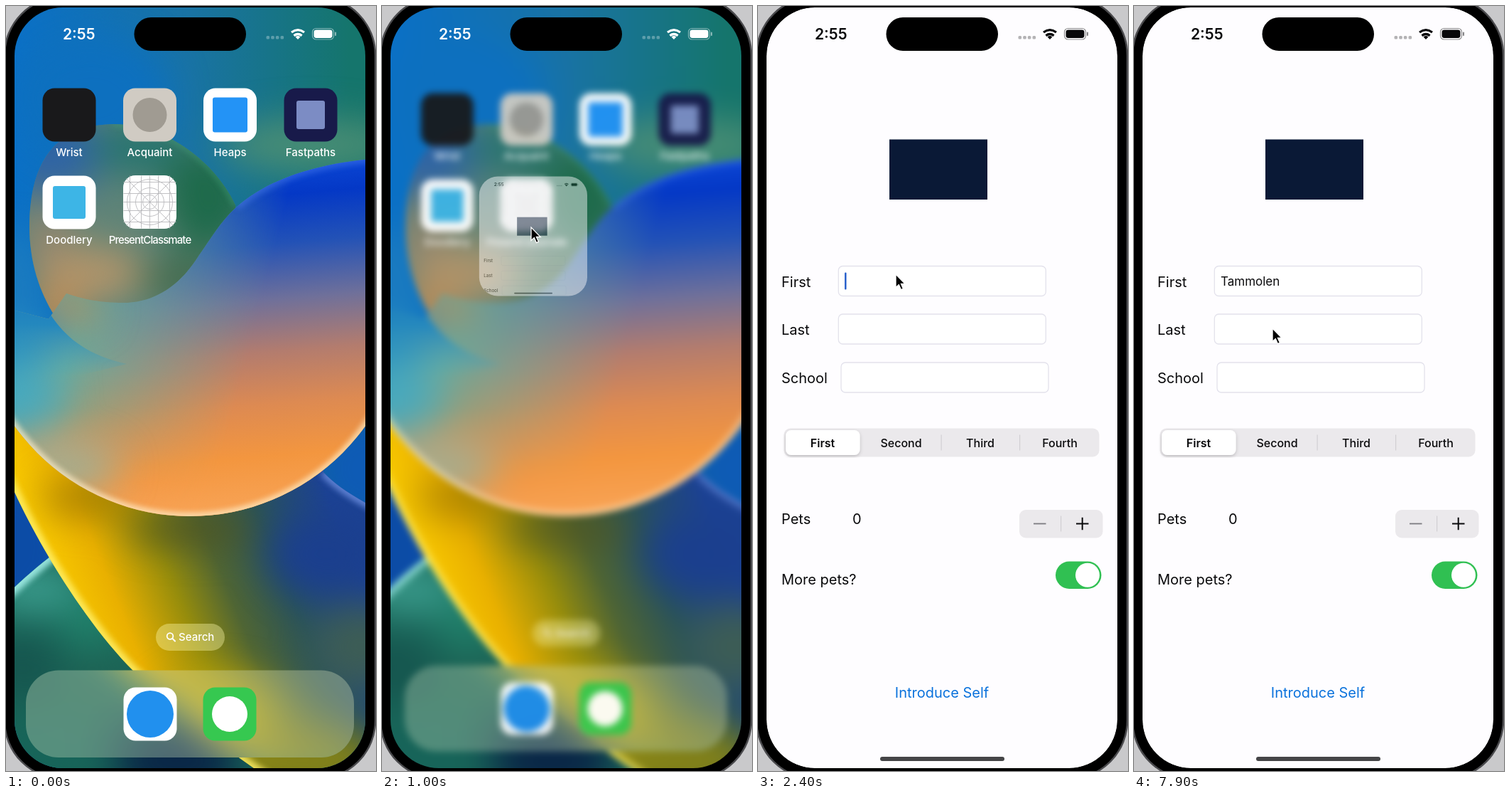
Recreate the animation shown at these times as an HTML page. Size 521 px wide and 1075 px high, loop 8000 ms.

```html
<!DOCTYPE html>
<html lang="en">
<head>
<meta charset="utf-8">
<style>
  html, body { margin: 0; width: 100%; height: 100%; overflow: hidden; background: #c9c9cb; }
  svg { display: block; width: 521px; height: 1075px; }
  text { font-family: Inter, "Open Sans", sans-serif; }
  .label { font-size: 20px; fill: #0a0a0c; }
  .tab { font-size: 16px; font-weight: 500; text-anchor: middle; fill: #0a0a0c; }
  .caption { font-size: 15px; font-weight: 500; text-anchor: middle; fill: #fff; }
  .field { fill: #fff; stroke: #e3e2ec; stroke-width: 1.3; }
  .gray { fill: #ebe9ec; }
</style>
</head>
<body>
<svg id="stage" viewBox="0 0 521 1075"></svg>
<script>
const LOOP = 8000;
const ICON = { x: 202.5, y: 275.5, size: 75 };
const SCREEN = { x: 12, y: 2, w: 494, h: 1069, r: 68 };
const NAME = 'Tammolen';
const KEY_TIMES = [3300, 3500, 3600, 3700, 3850, 4700, 4950, 5300];

const clamp = v => Math.max(0, Math.min(1, v));
const lerp = (a, b, p) => a + (b - a) * p;
const ramp = (t, from, to) => clamp((t - from) / (to - from));
const ease = p => p * p * (3 - 2 * p);

const box = (x, y, w, h, r, attrs) =>
  `<rect x="${x}" y="${y}" width="${w}" height="${h}" rx="${r}" ${attrs}/>`;
const label = (x, y, text, cls = 'label', attrs = '') =>
  `<text x="${x}" y="${y}" class="${cls}" ${attrs}>${text}</text>`;
const blob = (x, y, rx, ry, color) =>
  `<ellipse cx="${x}" cy="${y}" rx="${rx}" ry="${ry}" fill="${color}"/>`;
const glow = blobs => `<g filter="url(#soft)">${blobs.map(b => blob(...b)).join('')}</g>`;
const rim = (d, color, width, opacity) =>
  `<path d="${d}" fill="none" stroke="${color}" stroke-width="${width}" opacity="${opacity}" filter="url(#rim)"/>`;
const clipped = (id, d, content) =>
  `<clipPath id="${id}"><path d="${d}"/></clipPath><g clip-path="url(#${id})">${content}</g>`;
const gradient = (id, x1, y1, x2, y2, stops) =>
  `<linearGradient id="${id}" gradientUnits="userSpaceOnUse" x1="${x1}" y1="${y1}" x2="${x2}" y2="${y2}">` +
  stops.map(([offset, color]) => `<stop offset="${offset}" stop-color="${color}"/>`).join('') + '</linearGradient>';

// Wallpaper outlines
const TEAL_EDGE = 'M-60 895C-10 835 30 795 95 750';
const BAND_EDGE = 'M-60 530C-20 610 -5 650 12 683C50 765 115 870 180 935C240 985 300 1040 370 1085';
const BAND_TOP = 'M447 655C470 680 506 700 580 735';
const LOBE = 'M33 310C33 225 65 168 150 166C225 165 295 220 323 280L330 440L150 510C90 480 33 410 33 310Z';
const WAVE_TOP = 'M580 212C460 212 375 238 325 282';
const WAVE = WAVE_TOP + 'C300 305 288 328 272 350C246 392 210 417 165 417C130 417 105 411 85 404';
const BALL_ARC = 'M563 413A304 304 0 0 1 -45 413';
const BALL = WAVE + 'L60 440L-45 413A304 304 0 0 0 563 413Z';

function wallpaper() {
  return box(-60, -60, 641, 1200, 0, 'fill="url(#sky)"') +
    glow([[120, 130, 110, 90, '#0d70bf'], [430, 195, 130, 36, '#4b8e74'], [0, 400, 60, 90, '#1b7bbf'],
      [10, 520, 60, 70, '#38a4c2'], [520, 650, 100, 90, '#0e5bb5'], [0, 760, 100, 110, '#0c4ca6']]) +
    clipped('teal', TEAL_EDGE + 'L420 1140L-60 1140Z',
      box(-60, 740, 500, 400, 0, 'fill="#1a6759"') +
      glow([[40, 820, 70, 34, '#3a9b8c'], [120, 870, 40, 50, '#20806a'], [20, 930, 60, 50, '#16564f'],
        [130, 950, 60, 50, '#1d6254'], [50, 1050, 90, 50, '#176459'], [240, 1060, 90, 60, '#0a2747']]) +
      rim(TEAL_EDGE, '#a5f0ea', 16, .9)) +
    clipped('band', BAND_EDGE + 'L580 1085L580 735C506 700 470 680 447 655L447 560Z',
      box(-60, 500, 660, 620, 0, 'fill="url(#bandFill)"') +
      glow([[300, 1000, 90, 60, '#b8a50c'], [420, 1060, 110, 50, '#848218'], [500, 900, 70, 60, '#3d5d55'],
        [450, 770, 80, 60, '#1b3f8e'], [120, 690, 70, 26, '#a67f00'], [260, 735, 90, 20, '#4d5320']]) +
      rim(BAND_EDGE, '#fff06a', 14, .85) + rim(BAND_TOP, '#7d9ff0', 12, .7)) +
    clipped('lobe', LOBE,
      box(0, 140, 400, 400, 0, 'fill="#5f8478"') +
      glow([[60, 205, 80, 60, '#2f64a4'], [190, 200, 70, 40, '#27746f'], [285, 270, 65, 75, '#1e6a4b'],
        [250, 385, 60, 36, '#456c4f'], [60, 335, 36, 60, '#90856f'], [120, 375, 75, 40, '#b0946a'],
        [70, 430, 40, 40, '#b98b57']]) +
      rim('M150 166C225 165 295 220 323 280', '#3fa078', 6, .6)) +
    clipped('ball', BALL,
      box(-60, 200, 660, 540, 0, 'fill="url(#ballLeft)"') +
      box(-60, 200, 660, 540, 0, 'fill="url(#ballRight)" mask="url(#rightSide)"') +
      glow([[0, 545, 80, 55, '#48a9bd'], [0, 455, 70, 45, '#2488be'], [80, 650, 80, 34, '#a0ae93'],
        [85, 425, 50, 24, '#a58f68']]) +
      `<path d="M-50 400H45C70 460 110 490 170 503L60 530H-50Z" fill="url(#tail)"/>` +
      rim(BALL_ARC, '#fff0cc', 8, .95) + rim(WAVE_TOP, '#4f80f0', 10, .5));
}

function statusBar(color) {
  const arc = (r, dx) => `M${411 - dx} ${46 - r}Q411 ${46 - r - dx * .75} ${411 + dx} ${46 - r}`;
  return `<g fill="${color}">` + label(80, 47, '2:55', '', 'font-size="21" font-weight="600"') +
    [368.5, 375.2, 381.8, 388.5].map(x => box(x - 2, 42, 4.6, 4.5, 1.5, 'opacity=".3"')).join('') +
    `<g fill="none" stroke="${color}" stroke-width="3.2"><path d="${arc(9, 9)}"/><path d="${arc(4.4, 5.6)}"/></g>
     <path d="M411 47L407.6 43.4Q411 40.6 414.4 43.4Z"/>` +
    box(431.5, 31.5, 30, 15.5, 5, `fill="none" stroke="${color}" stroke-opacity=".45" stroke-width="1.2"`) +
    box(433.5, 33.5, 26, 11.5, 3.4, '') + box(463, 36.5, 2, 5.5, 1, 'opacity=".5"') + '</g>';
}

function appIcon(cx, cy, tile, inner = '', caption = '', attrs = '') {
  return `<g transform="translate(${cx} ${cy})">` + box(-37.5, -37.5, 75, 75, 17, `fill="${tile}"`) + inner +
    label(0, 58, caption, 'caption', attrs) + '</g>';
}

function homeScreen() {
  const disc = (r, color) => `<circle r="${r}" fill="${color}"/>`;
  const square = (s, color) => box(-s / 2, -s / 2, s, s, 3, `fill="${color}"`);
  const guides = `<g fill="none" stroke="#b9b9bd" stroke-width=".9">
    <path d="M-37 0H37M0-37V37M-37-12H37M-37 12H37M-12-37V37M12-37V37M-33-33L33 33M33-33L-33 33M-37-28H37M-37 28H37M-28-37V37M28-37V37"/>
    <circle r="10"/><circle r="20"/><circle r="32"/></g>`;
  return `<g clip-path="url(#dock)"><use href="#wallpaper" filter="url(#soft)"/></g>` +
    box(28, 933.5, 462, 122.5, 46, 'fill="#e8f0d0" fill-opacity=".3"') +
    appIcon(89, 153, '#19191b', '', 'Wrist') +
    appIcon(202.5, 153, '#d0cbc3', disc(24, '#a09b92'), 'Acquaint') +
    appIcon(315.5, 153, '#fff', square(49, '#2393f6'), 'Heaps') +
    appIcon(429, 153, '#181a4a', square(40, '#7c8cc4'), 'Fastpaths') +
    appIcon(89, 276, '#fff', square(46, '#3db5e6'), 'Doodlery') +
    appIcon(ICON.x, ICON.y, '#fff', guides, 'PresentClassmate', 'letter-spacing="-.9"') +
    appIcon(203, 995, '#fff', disc(33, '#2190ee')) +
    appIcon(315, 995, '#36c850', disc(25, '#fff')) +
    box(211, 868, 97, 38, 19, 'fill="#fffbb0" fill-opacity=".38"') +
    label(243, 892, 'Search', '', 'font-size="15" font-weight="500" fill="#fff"') +
    `<path d="M234.5 889L238 892.5" stroke="#fff" stroke-width="2" stroke-linecap="round"/>
     <circle cx="231" cy="885.5" r="4.3" fill="none" stroke="#fff" stroke-width="1.8"/>`;
}

function form() {
  const tabs = ['First', 'Second', 'Third', 'Fourth'];
  const centers = [91, 201.5, 313, 425];
  const field = (x, y) => box(x, y, 292, 42, 6, 'class="field"');
  const divider = (x, y) => box(x, y, 1.2, 22, 0, 'fill="#d1cfd3"');
  return statusBar('#08080a') +
    box(185, 187.5, 138, 84.5, 0, 'fill="#0a1936"') +
    label(33, 394.5, 'First') + field(113.3, 365.5) +
    label(33, 462, 'Last') + field(113.3, 433) +
    label(33, 530, 'School') + field(117, 501) +
    box(36.5, 593.5, 444, 40, 9, 'class="gray"') +
    box(39, 596, 104.5, 35, 8, 'fill="#fff" filter="url(#shadow)"') +
    divider(257.5, 602.5) + divider(368, 602.5) +
    tabs.map((name, i) => label(centers[i], 619.5, name, 'tab', i ? '' : 'style="font-weight:600"')).join('') +
    label(33, 728, 'Pets') + label(133, 728, '0') +
    box(368, 708, 117.5, 39.5, 9, 'class="gray"') + divider(426, 716.5) +
    `<path d="M388 727.5H405.5" stroke="#7c7b80" stroke-width="1.8"/>
     <path d="M448 727.5H465.5M456.7 718.7V736.3" stroke="#0a0a0c" stroke-width="2"/>` +
    label(33, 813, 'More pets?') +
    box(419, 780.5, 64.5, 38.5, 19.25, 'fill="#30c052"') + `<circle cx="464" cy="799.7" r="17" fill="#fff"/>` +
    label(259, 971.5, 'Introduce Self', 'label', 'text-anchor="middle" style="fill:#0a72dc"') +
    `<rect id="highlight" x="118.5" y="374" height="25" fill="#c8dcee"/>
     <text id="typed" x="122" y="392.5" font-size="17" fill="#0a0a0c"></text>
     <rect id="caret" width="2.5" height="24" rx="1" fill="#2a62cc"/>`;
}

const stage = document.getElementById('stage');
const screenBox = box(SCREEN.x, SCREEN.y, SCREEN.w, SCREEN.h, SCREEN.r, '');
const blur = (id, deviation) =>
  `<filter id="${id}" filterUnits="userSpaceOnUse" x="-150" y="-100" width="850" height="1300" color-interpolation-filters="sRGB"><feGaussianBlur stdDeviation="${deviation}"/></filter>`;

stage.innerHTML = `<defs>
  ${gradient('sky', -60, 0, 581, 0, [[.1, '#0a70c8'], [.5, '#1973a4'], [.85, '#15756c']])}
  ${gradient('bandFill', 80, 830, 450, 680, [[0, '#f8c800'], [.17, '#e9b000'], [.38, '#958c0c'], [.55, '#4f6534'], [.75, '#2a5358'], [1, '#1c4294']])}
  ${gradient('ballLeft', 0, 400, 0, 717, [[0, '#6ba596'], [.35, '#6faa99'], [.52, '#88a486'], [.7, '#bd9d6c'], [.85, '#ef9848'], [1, '#f8a355']])}
  ${gradient('ballRight', 400, 215, 440, 700, [[0, '#0c48d6'], [.1, '#0438c6'], [.24, '#2352b6'], [.4, '#6f709a'], [.55, '#b37c6e'], [.7, '#dd8a52'], [.85, '#f3963f'], [1, '#f8a355']])}
  ${gradient('fade', 215, 0, 450, 60, [[0, '#000'], [1, '#fff']])}
  <linearGradient id="tail" gradientUnits="userSpaceOnUse" x1="0" y1="400" x2="0" y2="520">
    <stop stop-color="#1b7bbf"/><stop offset=".4" stop-color="#2488be"/><stop offset="1" stop-color="#43a8bf" stop-opacity="0"/></linearGradient>
  <mask id="rightSide" maskUnits="userSpaceOnUse" x="-60" y="200" width="660" height="540">${box(-60, 200, 660, 540, 0, 'fill="url(#fade)"')}</mask>
  ${blur('soft', 26)}${blur('rim', 4)}
  <filter id="shadow"><feDropShadow dx="0" dy="2" stdDeviation="2.5" flood-opacity=".2"/></filter>
  <clipPath id="screen">${screenBox}</clipPath>
  <clipPath id="dock">${box(28, 933.5, 462, 122.5, 46, '')}</clipPath>
  <clipPath id="windowClip"><rect id="windowRect"/></clipPath>
</defs>
${box(-2, -13, 522, 1099, 82, 'fill="#000" stroke="#4a4a4d" stroke-width="2.5"')}
<g clip-path="url(#screen)">
  <g id="home"><g id="wallpaper">${wallpaper()}</g><g id="icons">${homeScreen()}</g></g>
  <g id="homeStatus">${statusBar('#fff')}</g>
  <g id="app" clip-path="url(#windowClip)">
    <rect width="521" height="1075" fill="#fefdff"/>
    <g id="content">${form()}</g>
    <rect id="homeBar" fill="#454547"/>
  </g>
</g>
${box(180.5, 16, 157.5, 47, 23.5, 'fill="#000"')}
<path id="pointer" d="M0 0V18.5L4.3 14.6L7.4 21.6L10.4 20.3L7.4 13.5H13.2Z" fill="#000" stroke="#fff" stroke-width="1.3"/>`;

const el = id => document.getElementById(id);
const set = (id, attrs) => Object.entries(attrs).forEach(([k, v]) => el(id).setAttribute(k, v));

function drawLaunch(t) {
  const phase = 15.3 * Math.max(0, t - 950) / 1000;
  const p = 1 - (1 + phase) * Math.exp(-phase);
  const w = lerp(ICON.size, SCREEN.w, p);
  const h = lerp(ICON.size, SCREEN.h, p ** 1.4);
  const x = lerp(ICON.x, SCREEN.x + SCREEN.w / 2, p) - w / 2;
  const y = lerp(ICON.y, SCREEN.y + SCREEN.h / 2, p) - h / 2;
  const s = w / SCREEN.w;

  el('home').style.display = p > .9995 ? 'none' : '';
  el('home').style.filter = p > 0 ? `blur(${26 * p}px)` : 'none';
  set('icons', { transform: `translate(259 536.5) scale(${1 - .09 * p}) translate(-259 -536.5)`, opacity: 1 - .3 * p });
  set('homeStatus', { opacity: 1 - p ** 4 });
  set('windowRect', { x, y, width: w, height: h, rx: lerp(17, SCREEN.r, p) });
  set('app', { opacity: clamp(p / .4) });
  set('content', { transform: `translate(${x - SCREEN.x * s} ${y - SCREEN.y * s}) scale(${s})` });
  set('homeBar', { x: x + 160 * s, y: y + h - 16 * s, width: 175 * s, height: 6 * s, rx: 3 * s });
}

function blink(age) {
  const a = age % 1000;
  return a < 700 ? 1 - ramp(a, 500, 700) : ramp(a, 800, 900);
}

function drawTyping(t) {
  const count = KEY_TIMES.filter(k => t >= k).length;
  el('typed').textContent = NAME.slice(0, count);
  const width = count ? el('typed').getComputedTextLength() : 0;
  const onLast = t >= 7200;
  const since = onLast ? 7200 : count ? KEY_TIMES[count - 1] : 2380;
  const focused = t >= 2380 && (t < 7150 || onLast);
  set('highlight', { width: width + 4, opacity: t >= 3880 && t < 5500 ? 1 : 0 });
  set('caret', {
    x: onLast ? 122 : 122 + width - (count ? 1 : 0),
    y: onLast ? 442.5 : 374.5,
    opacity: focused ? blink(t - since) : 0
  });
}

function drawPointer(t) {
  const enter = ease(ramp(t, 100, 550));
  const toFirst = ease(ramp(t, 1880, 2320));
  const toLast = ease(ramp(t, 6300, 7000));
  const x = lerp(521, 210, enter) - 16 * toFirst + toLast;
  const y = lerp(430, 311, enter) + 66 * toFirst + 76 * toLast;
  set('pointer', { transform: `translate(${x} ${y})`, opacity: t < 100 ? 0 : 1 });
}

const start = performance.now();
function frame() {
  const t = (performance.now() - start) % LOOP;
  drawLaunch(t);
  drawTyping(t);
  drawPointer(t);
  requestAnimationFrame(frame);
}
frame();
</script>
</body>
</html>
```
